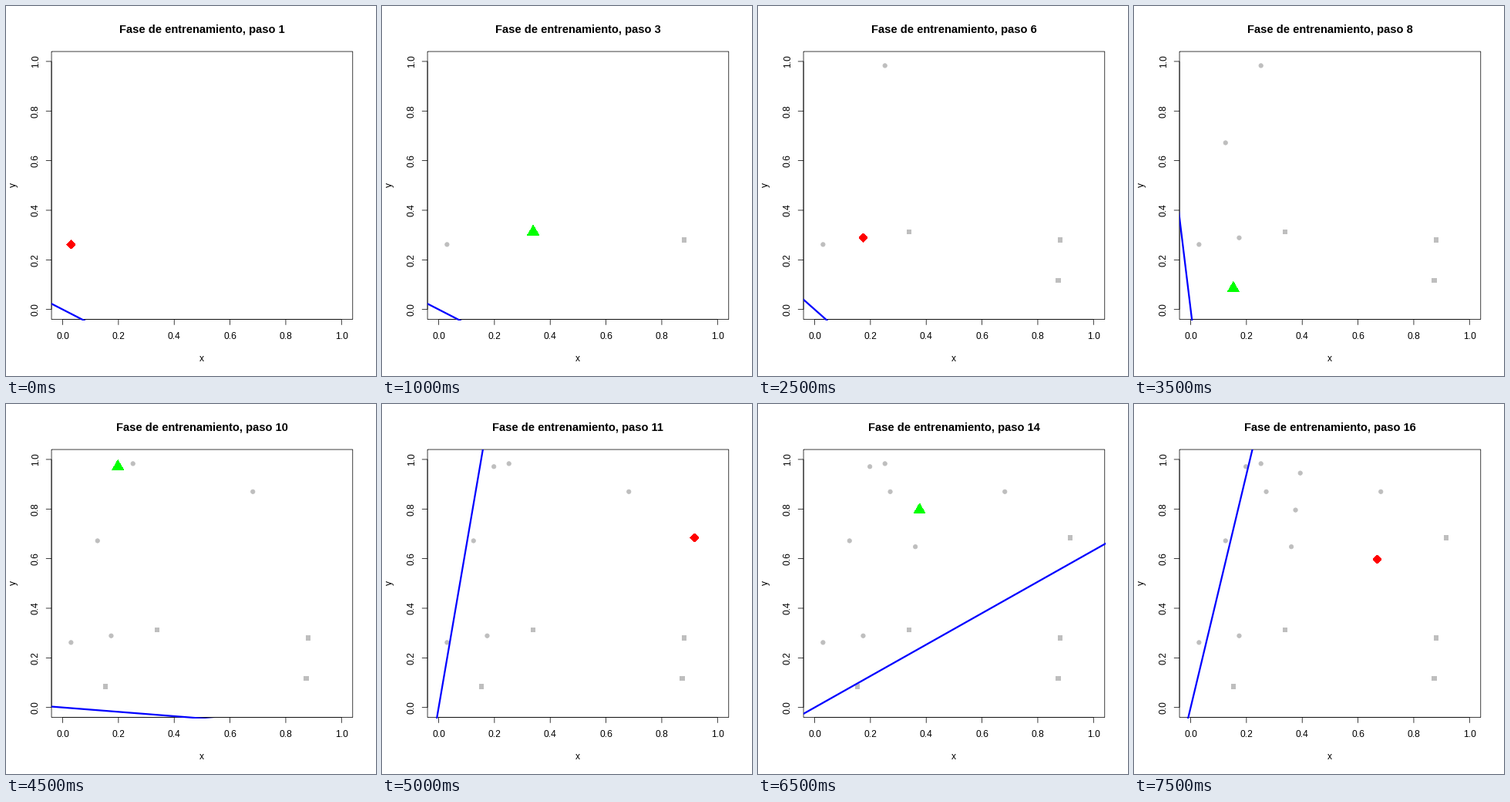
Animation, 480 px wide and 480 px high, one loop 8000 ms. Source, as a matplotlib script:

```python
import matplotlib.pyplot as plt
from matplotlib.animation import FuncAnimation
from matplotlib.patches import Circle, Polygon, Rectangle

plt.rcParams["font.family"] = "Liberation Sans"

SIZE, DPI = 480, 72
LEFT, TOP, RIGHT, BOTTOM = 59.04, 59.04, 449.76, 406.56
CX, CY = (LEFT + RIGHT) / 2, (TOP + BOTTOM) / 2
LINE_HEIGHT = 14.4
THIN = 0.75

POINTS = [
    (0.030, 0.262), (0.880, 0.280), (0.339, 0.313), (0.873, 0.117),
    (0.252, 0.983), (0.174, 0.289), (0.125, 0.672), (0.153, 0.085),
    (0.682, 0.870), (0.198, 0.971), (0.917, 0.684), (0.361, 0.648),
    (0.271, 0.870), (0.376, 0.796), (0.393, 0.945), (0.669, 0.597),
]
START_WEIGHTS = (1.188, 2.270)


def px(x):
    return LEFT + (x + 0.04) * (RIGHT - LEFT) / 1.08


def py(y):
    return BOTTOM - (y + 0.04) * (BOTTOM - TOP) / 1.08


def below_diagonal(x, y):
    return x > y


def train(points, weights):
    """Perceptron without bias: (line slope, was it wrong) for each step."""
    a, b = weights
    history = []
    for step, (x, y) in enumerate(points, 1):
        square = below_diagonal(x, y)
        wrong = (a * x + b * y > 0) != square
        if wrong:
            rate = 1 - (step / 24.7) ** 5
            rate = rate if square else -rate
            a, b = a + rate * x, b + rate * y
        history.append((-a / b, wrong))
    return history


fig = plt.figure(figsize=(SIZE / DPI, SIZE / DPI), dpi=DPI, facecolor="white")
ax = fig.add_axes([0, 0, 1, 1])
ax.set_xlim(0, SIZE)
ax.set_ylim(SIZE, 0)
ax.axis("off")


def rule(xs, ys):
    ax.plot(xs, ys, color="black", lw=THIN, snap=False,
            solid_capstyle="butt", solid_joinstyle="miter")


def label(x, y, text, size=12, **kw):
    return ax.text(x, y, text, size=size, ha="center", va="baseline",
                   rotation_mode="anchor", **kw)


def draw_axes():
    tick = LINE_HEIGHT / 2
    rule([LEFT, RIGHT, RIGHT, LEFT, LEFT], [TOP, TOP, BOTTOM, BOTTOM, TOP])
    rule([px(0), px(1)], [BOTTOM, BOTTOM])
    rule([LEFT, LEFT], [py(0), py(1)])
    for k in range(6):
        v = k / 5
        rule([px(v), px(v)], [BOTTOM, BOTTOM + tick])
        rule([LEFT - tick, LEFT], [py(v), py(v)])
        label(px(v), BOTTOM + 1.8 * LINE_HEIGHT, f"{v:.1f}")
        label(LEFT - 1.2 * LINE_HEIGHT, py(v), f"{v:.1f}", rotation=90)
    label(CX - 1, BOTTOM + 3.8 * LINE_HEIGHT, "x")
    label(LEFT - 3.2 * LINE_HEIGHT, CY - 1, "y", rotation=90)


def seen_mark(x, y, square, r=2.7):
    if square:
        return Rectangle((x - r, y - r), 2 * r, 2 * r, fc="#bebebe",
                         ec="none", aa=False, snap=False, zorder=3)
    return Circle((x, y), r, fc="#bebebe", ec="#bebebe", lw=THIN, zorder=3)


def active_mark(x, y, wrong):
    if wrong:
        r, color = 5.4, "#ff0000"
        pts = [(x - r, y), (x, y - r), (x + r, y), (x, y + r)]
    else:
        r, color = 8.4, "#00ff00"
        half = r * 3 ** 0.5 / 2
        pts = [(x, y - r), (x + half, y + r / 2), (x - half, y + r / 2)]
    return Polygon(pts, closed=True, fc=color, ec="none", aa=False,
                   snap=False, zorder=5)


draw_axes()
title = label(CX, 35, "", size=14.6, weight="bold")
frontier, = ax.plot([], [], color="#0000ff", lw=3 * THIN, zorder=4)
frontier.set_clip_path(Rectangle((LEFT, TOP), RIGHT - LEFT + 1,
                                 BOTTOM - TOP + 1, transform=ax.transData))

history = train(POINTS, START_WEIGHTS)
seen, active = [], []
for (x, y), (_, wrong) in zip(POINTS, history):
    seen.append(ax.add_patch(seen_mark(px(x), py(y), below_diagonal(x, y))))
    active.append(ax.add_patch(active_mark(px(x), py(y), wrong)))


def update(i):
    title.set_text(f"Fase de entrenamiento, paso {i + 1}")
    slope = history[i][0]
    xs = (-0.1, 1.2)
    frontier.set_data([px(x) for x in xs], [py(slope * x) for x in xs])
    for k, (old, new) in enumerate(zip(seen, active)):
        old.set_visible(k < i)
        new.set_visible(k == i)
    return [title, frontier, *seen, *active]


anim = FuncAnimation(fig, update, frames=len(POINTS), interval=500,
                     repeat=True, repeat_delay=0, blit=False)
plt.show()
```
